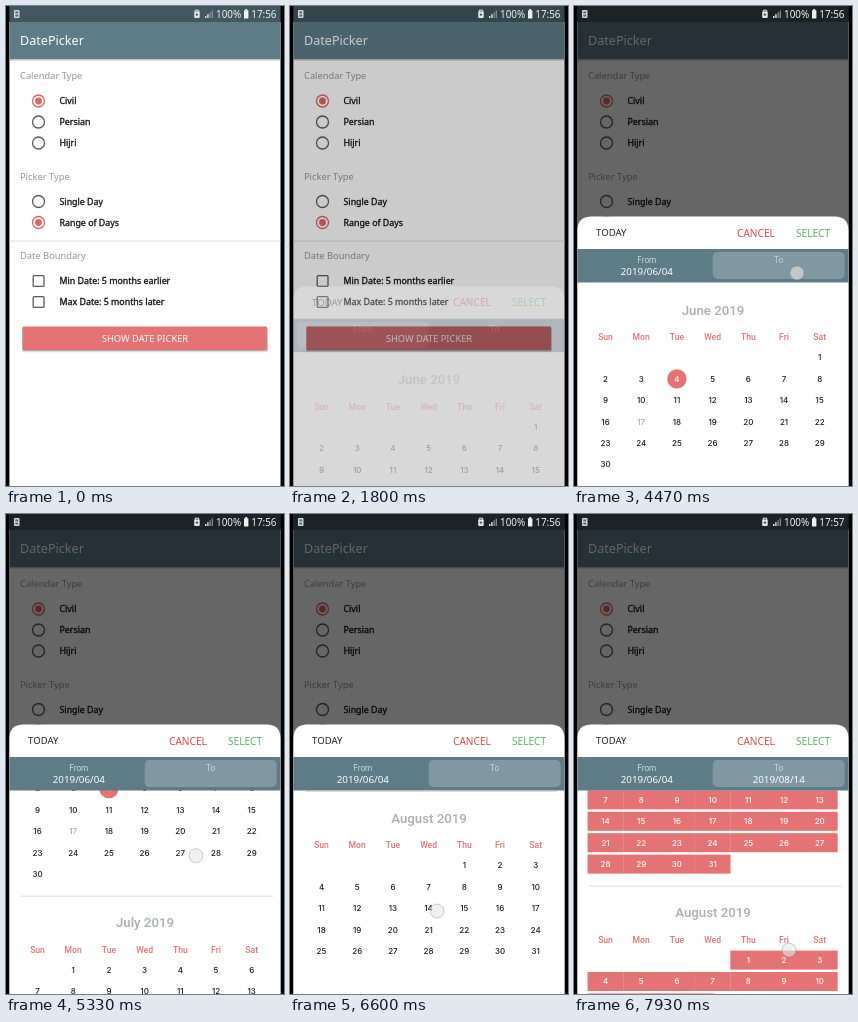
Animation of 278 by 480 pixels, one loop 8 s. Source, as an HTML page:

```html
<!DOCTYPE html>
<html lang="en">
<head>
<meta charset="utf-8">
<title>Date picker</title>
<style>
html, body { margin: 0; width: 100%; height: 100%; overflow: hidden; background: #000; }
svg { display: block; width: 100%; height: 100%; }
text { font-family: Roboto, sans-serif; white-space: pre; }
.ui { font-family: "Noto Sans", sans-serif; }
.label { stroke: #111; stroke-width: .3px; }
.num { font-family: Inter, sans-serif; font-weight: 500; }
</style>
</head>
<body>
<svg id="stage" viewBox="0 0 278 480"></svg>
<script>
const LOOP = 8000;
const RED = '#e57373', TEAL = '#5d7c87';
const LEFT = 3.4, WIDTH = 271.1;
const COL0 = 31.5, COL = 35.7, ROW = 21.4, TITLE_Y = 304;
const svg = document.getElementById('stage');
const $ = id => document.getElementById(id);
const clamp = v => Math.max(0, Math.min(1, v));
const span = (t, a, b) => clamp((t - a) / (b - a));

// Text whose capitals are centred on cy.
const text = (x, cy, size, str, fill, attrs = '') =>
  `<text x="${x}" y="${(cy + size * 0.357).toFixed(2)}" font-size="${size}" fill="${fill}" ${attrs}>${str}</text>`;
const rect = (x, y, w, h, fill, attrs = '') =>
  `<rect x="${x}" y="${y}" width="${w}" height="${h}" fill="${fill}" ${attrs}/>`;
const circle = (x, y, r, fill, attrs = '') =>
  `<circle cx="${x}" cy="${y}" r="${r}" fill="${fill}" ${attrs}/>`;
const band = (y, h, fill, attrs) => rect(LEFT, y, WIDTH, h, fill, attrs);
const MID = 'text-anchor="middle"';
const UI = 'class="ui"';

function statusIcons() {
  return rect(8, 4, 5.5, 8, '#d5dadc', 'rx="1"') + rect(9.3, 5.4, 2.9, 2, '#56666d') + rect(9.3, 8.6, 2.9, 2, '#56666d') +
    rect(188.2, 5.5, 5.5, 6.5, '#e4e8ea', 'rx="1"') +
    '<path d="M189.2 6V4.2h3.5V6" fill="none" stroke="#e4e8ea"/>' + circle(190.9, 8.6, 1.2, '#4a565c') +
    [0, 1, 2, 3].map(i => rect(199 + i * 2.2, 10 - i * 1.8, 1.4, 2 + i * 1.8, i < 2 ? '#dfe4e6' : '#7d8a90')).join('') +
    text(210, 8, 9.9, '100%', '#eef1f2', UI) +
    rect(238, 4.2, 4.4, 8.3, '#eef1f2', 'rx=".6"') + rect(239.2, 3, 2, 1.5, '#eef1f2') +
    text(270.5, 8, 9.9, '17:56', '#eef1f2', UI + ' id="clock" text-anchor="end"');
}

const label = (y, str) => text(53.5, y + 0.2, 8.85, str, '#111', 'class="ui label"');

function radio(y, str, on) {
  const c = on ? '#e26464' : '#5a5a5a';
  return circle(32.5, y, 6, 'none', `stroke="${c}" stroke-width="1.3"`) +
    (on ? circle(32.5, y, 3.4, c) : '') + label(y, str);
}

const check = (y, str) =>
  rect(27.2, y - 5.4, 10.8, 10.8, 'none', 'rx="1" stroke="#5a5a5a" stroke-width="1.3"') + label(y, str);

function page() {
  const head = (y, s) => text(14, y, 9.3, s, '#959595', UI);
  return band(16, 464, '#fff') + band(53, 2.5, 'url(#shade)') +
    band(0, 16, '#435761') + band(16, 37, TEAL) +
    text(14, 34.5, 12.6, 'DatePicker', '#fff', UI) +
    head(70, 'Calendar Type') + radio(95, 'Civil', true) + radio(116, 'Persian') + radio(137, 'Hijri') +
    head(170.5, 'Picker Type') + radio(195.5, 'Single Day') + radio(216.5, 'Range of Days', true) +
    band(234.6, 1, '#dcdcdc') +
    head(250, 'Date Boundary') + check(275, 'Min Date: 5 months earlier') + check(296, 'Max Date: 5 months later') +
    rect(16, 322, 246, 24.3, '#000', 'rx="1.5" opacity=".13"') +
    rect(16.5, 321.5, 245, 23.5, '#000', 'rx="1.5" opacity=".2"') +
    rect(16.5, 320.5, 244.5, 23.5, RED, 'rx="1.2"') +
    `<g clip-path="url(#btn)">${circle(196, 333, 0, '#c62828', 'id="ripple" opacity="0"')}</g>` +
    text(139, 332.7, 9.3, 'SHOW DATE PICKER', '#fff', UI + ' ' + MID);
}

// Days are numbered across months: month * 100 + day.
const months = [
  { id: 6, name: 'June 2019', first: 6, days: 30 },
  { id: 7, name: 'July 2019', first: 1, days: 31 },
  { id: 8, name: 'August 2019', first: 4, days: 31 }
];
const WEEK = ['Sun', 'Mon', 'Tue', 'Wed', 'Thu', 'Fri', 'Sat'];
const FROM = 604, TO = 814, TODAY = 617;
const days = [];
let lastTitle = 0;

function calendar() {
  let y = TITLE_Y, out = '';
  months.forEach((m, i) => {
    lastTitle = y;
    out += text(139, y, 13.25, m.name, '#a9b0b3', MID + ' font-weight="500"');
    WEEK.forEach((w, c) => out += text(COL0 + c * COL, y + 27, 8.6, w, RED, MID + ' font-weight="500"'));
    let rowY;
    for (let d = 1; d <= m.days; d++) {
      const n = m.first + d - 1;
      rowY = y + 47.5 + Math.floor(n / 7) * ROW;
      days.push({ key: m.id * 100 + d, d, x: COL0 + n % 7 * COL, y: rowY });
    }
    if (i < 2) out += rect(15, rowY + 21.5, 252, 1, '#dcdcdc');
    y = rowY + 48.5;
  });
  const marks = days.map(({ key, x, y }) => {
    const half = COL / 2 + 0.1;
    if (key === FROM) return circle(x, y, 9.7, RED, 'class="from"') + rect(x, y - 9.5, half, 19, RED, 'class="range"');
    if (key === TO) return circle(x, y, 9.5, RED, 'class="range"') + rect(x - half, y - 9.5, half, 19, RED, 'class="range"');
    return key > FROM && key < TO ? rect(x - half, y - 9.5, half * 2, 19, RED, 'class="range"') : '';
  }).join('');
  const nums = days.map(o => text(o.x, o.y, 8, o.d, '#1c1c1c', `${MID} class="num" id="d${o.key}"`)).join('');
  return out + marks + nums;
}

function sheet() {
  const tab = (x, name, date, id) =>
    rect(x - 66, 246, 132, 27, '#fff', `rx="5" id="${id}Tab" fill-opacity=".21"`) +
    text(x, 253.8, 8.3, name, '#cdd7db', MID) +
    text(x, 265.8, 9.8, date, '#fff', `${MID} ${UI} id="${id}Date"`);
  return `<path d="M${LEFT} 480V224.5q0-14 14-14h${WIDTH - 28}q14 0 14 14V480z" fill="#fff"/>` +
    `<g clip-path="url(#list)"><g id="months">${calendar()}</g></g>` +
    text(22, 227, 9.6, 'TODAY', '#222', UI) + text(163, 227, 10.1, 'CANCEL', '#e84848', UI) +
    text(222, 227, 10.1, 'SELECT', '#5fb565', UI) +
    band(243, 33.5, TEAL) +
    tab(72.8, 'From', '2019/06/04', 'from') + tab(204.7, 'To', '2019/08/14', 'to');
}

svg.innerHTML =
  `<defs>
    <linearGradient id="shade" x2="0" y2="1"><stop stop-opacity=".3"/><stop offset="1" stop-opacity="0"/></linearGradient>
    <clipPath id="btn">${rect(16.5, 320.5, 244.5, 23.5, '#000')}</clipPath>
    <clipPath id="list">${band(276, 204, '#000')}</clipPath>
  </defs>` + rect(0, 0, 278, 480, '#000') +
  page() + band(0, 480, '#000', 'id="scrim" opacity="0"') +
  statusIcons() + `<g id="sheet">${sheet()}</g>` +
  circle(0, 0, 7, '#e6e6e6', 'id="touch" fill-opacity=".62" stroke="#777" stroke-opacity=".45" stroke-width=".8"');

const set = (id, attrs) => { for (const k in attrs) $(id).setAttribute(k, attrs[k]); };
const END = lastTitle - TITLE_Y;
const DRAG = 150, BACK = 94.6;

function scrollAt(t) {
  if (t < 5400) return DRAG * span(t, 5070, 5400) ** 1.8;
  if (t < 7600) return END - (END - DRAG) * (1 - span(t, 5400, 6200)) ** 2.8;
  return END - BACK * span(t, 7600, 7930) ** 1.4;
}

// start, end, x, y(scroll)
const touches = [
  [1130, 1400, 196, () => 333],
  [3130, 3340, 104, () => 374],
  [4160, 4560, 223, () => 267],
  [5070, 5400, 190, s => 440 - s],
  [6560, 6800, 147, () => 397],
  [7580, 8100, 215, s => 436 - BACK + END - s]
];

let mode = -1;
function mark(next) {
  if (next === mode) return;
  mode = next;
  const show = (cls, on) => svg.querySelectorAll(cls).forEach(e => e.style.display = on ? '' : 'none');
  show('.from', mode > 0);
  show('.range', mode > 1);
  for (const { key } of days) {
    const on = mode > 0 && key === FROM || mode > 1 && key >= FROM && key <= TO;
    set('d' + key, { fill: on ? '#fff' : key === TODAY ? '#a8a8a8' : '#1c1c1c' });
  }
}

function draw(t) {
  const rise = (1 - Math.cos(Math.PI * span(t, 1750, 1900))) / 2;
  set('scrim', { opacity: 0.6 * span(t, 1740, 1920) });
  set('sheet', { opacity: rise, transform: `translate(0 ${94 * (1 - rise)})` });

  const press = span(t, 1160, 1560);
  set('ripple', { r: 185 * press, opacity: 0.5 * span(t, 1150, 1250) * (1 - span(t, 1850, 2000)) });

  mark(t < 3260 ? 0 : t < 6730 ? 1 : 2);
  const swap = span(t, 4330, 4430);
  set('fromTab', { opacity: 1 - swap });
  set('toTab', { opacity: swap });
  set('fromDate', { opacity: t < 3260 ? 0 : 1 });
  set('toDate', { opacity: t < 6730 ? 0 : 1 });

  const s = scrollAt(t);
  set('months', { transform: `translate(0 ${-s})` });
  $('clock').textContent = t < 6930 ? '17:56' : '17:57';

  const hit = touches.find(([a, b]) => t >= a && t < b + 70);
  set('touch', hit
    ? { cx: hit[2], cy: hit[3](s), opacity: 1 - span(t, hit[1], hit[1] + 70) }
    : { opacity: 0 });
}

const start = performance.now();
function tick() {
  draw((performance.now() - start) % LOOP);
  requestAnimationFrame(tick);
}
tick();
</script>
</body>
</html>
```
